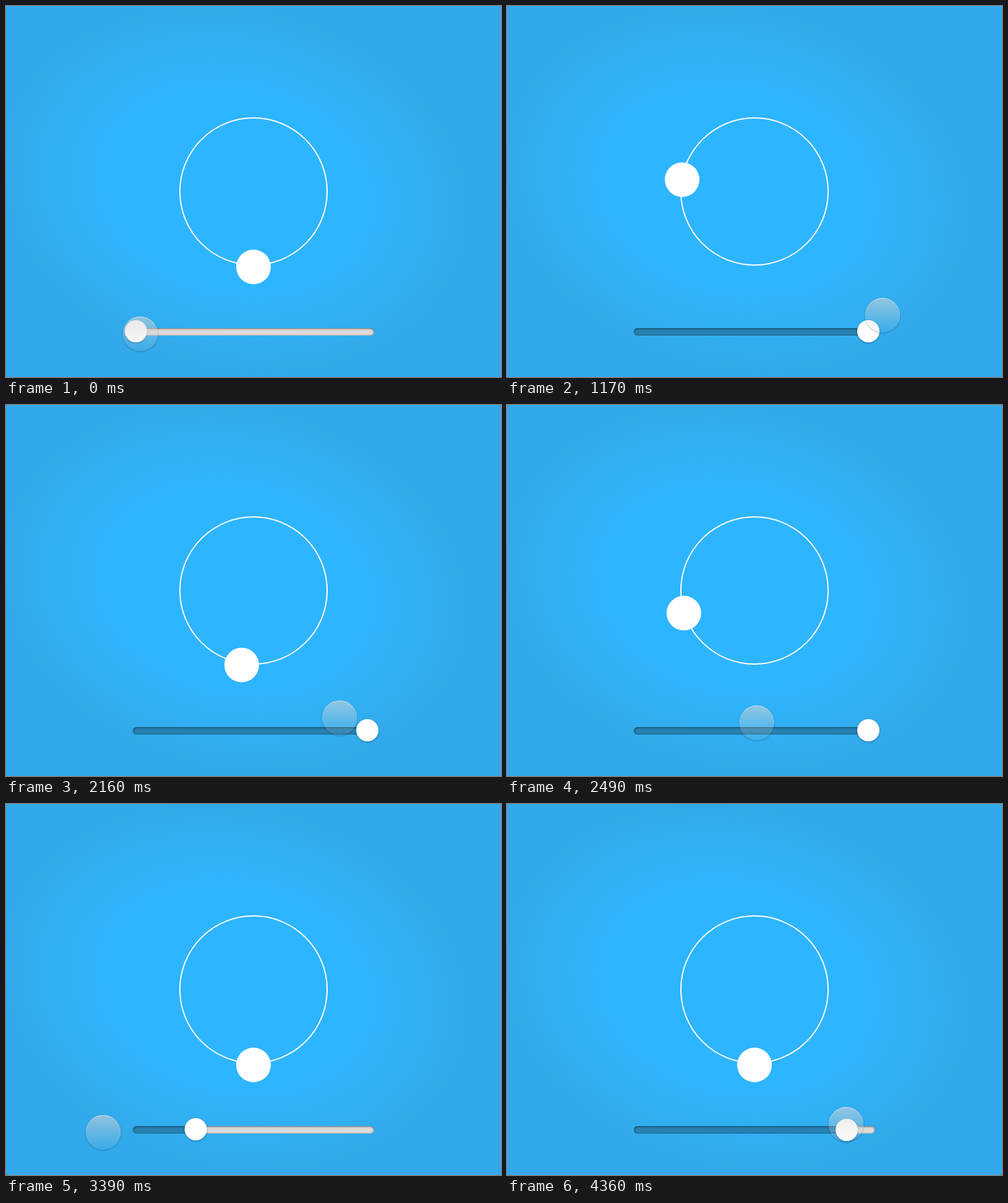
An HTML page for the animation above (4530 ms loop, 800 by 600 pixels).

```html
<!DOCTYPE html>
<html lang="en">
<head>
<meta charset="utf-8">
<title>Slider and orbit</title>
<style>
  html, body { margin: 0; width: 100%; height: 100%; overflow: hidden; }
  #stage {
    position: relative; width: 800px; height: 600px; overflow: hidden;
    background: #32a9ea;
  }
  #stage div { position: absolute; box-sizing: border-box; }
  #stage #glow {
    left: -30px; top: -105px; width: 800px; height: 800px;
    transform: rotate(14deg);
    background: radial-gradient(ellipse 378px 288px at center,
      #2eb5ff 0%, #2eb5ff 55%, #30b0f3 78%, #32a9ea 100%);
  }
  #ring {
    left: 280px; top: 180px; width: 240px; height: 240px;
    border: 2px solid #fff; border-radius: 50%;
  }
  .disc { left: 0; top: 0; border-radius: 50%; }
  #ball { width: 56px; height: 56px; background: #fff; }
  #track, #fill {
    left: 205px; top: 521px; height: 12px; border-radius: 6px;
    box-shadow: inset 0 0 2px rgba(0, 0, 0, .4), inset 0 1px 3px rgba(0, 0, 0, .45);
  }
  #track { width: 390px; background: #dcdad9; }
  #fill { background: #2681b1; }
  #knob {
    width: 36px; height: 36px; background: #fff;
    box-shadow: 0 1px 3px rgba(0, 0, 0, .35);
  }
  #touch {
    width: 56px; height: 56px;
    background: linear-gradient(rgba(212, 212, 212, .6), rgba(212, 212, 212, .04));
    box-shadow: inset 0 1px 1px rgba(255, 255, 255, .4),
      inset 0 0 1px rgba(255, 255, 255, .45), 0 1px 3px rgba(0, 0, 0, .3);
  }
</style>
</head>
<body>
<div id="stage">
  <div id="glow"></div>
  <div id="ring"></div>
  <div id="ball" class="disc"></div>
  <div id="track"></div>
  <div id="fill"></div>
  <div id="knob" class="disc"></div>
  <div id="touch" class="disc"></div>
</div>
<script>
const LOOP = 4530, STEP = 30, LAST = 4360;
const el = id => document.getElementById(id);
const ball = el('ball'), fill = el('fill'), knob = el('knob'), touch = el('touch');

const linear = u => u;
const sine = u => (1 - Math.cos(Math.PI * u)) / 2;
const power = p => u => u ** p;

// The share of a shift that has happened between two times.
function move(t, start, end, shift, ease = linear) {
  const u = Math.min(1, Math.max(0, (t - start) / (end - start)));
  return shift * ease(u);
}

// Degrees travelled from the bottom: once around, then back.
const turn = t =>
  move(t, 0, 690, 76.7) + move(t, 690, 1500, 283.8, sine)
  - move(t, 2110, 2870, 148.2) - move(t, 2875, 3345, 212.3, sine);

const knobX = t =>
  210 + move(t, 0, 600, 374) - move(t, 2730, 3620, 374) + move(t, 3620, LAST, 339);

const knobY = t => 526 + move(t, 3820, LAST, 1);

const touchX = t =>
  217 + move(t, 570, 600, 390) - move(t, 1995, 3090, 450) + move(t, 3425, LAST, 391);

const touchY = t =>
  530 - move(t, 570, 600, 30) + move(t, 1995, 3090, 26, power(.8))
  + move(t, 3090, 3425, 5.5) - move(t, 3425, LAST, 13.5, power(1.5));

// The picture steps at a fixed rate, slipping 10 ms late in the loop.
function quantize(t) {
  const slip = t < 3790 ? 0 : 10;
  return Math.min(LAST, Math.floor((t - slip) / STEP) * STEP + slip);
}

function place(node, x, y, r) {
  node.style.transform = `translate(${x - r}px, ${y - r}px)`;
}

function draw(time) {
  const t = quantize(time % LOOP);
  const angle = (90 - turn(t)) * Math.PI / 180;
  place(ball, 400 + 119 * Math.cos(angle), 303 + 119 * Math.sin(angle), 28);
  place(knob, knobX(t), knobY(t), 18);
  place(touch, touchX(t), touchY(t), 28);
  fill.style.width = knobX(t) - 205 + 'px';
}

let origin = null;
function tick(now) {
  if (origin === null) origin = now;
  draw(Math.max(0, now - origin));
  requestAnimationFrame(tick);
}
draw(0);
requestAnimationFrame(tick);
</script>
</body>
</html>
```
